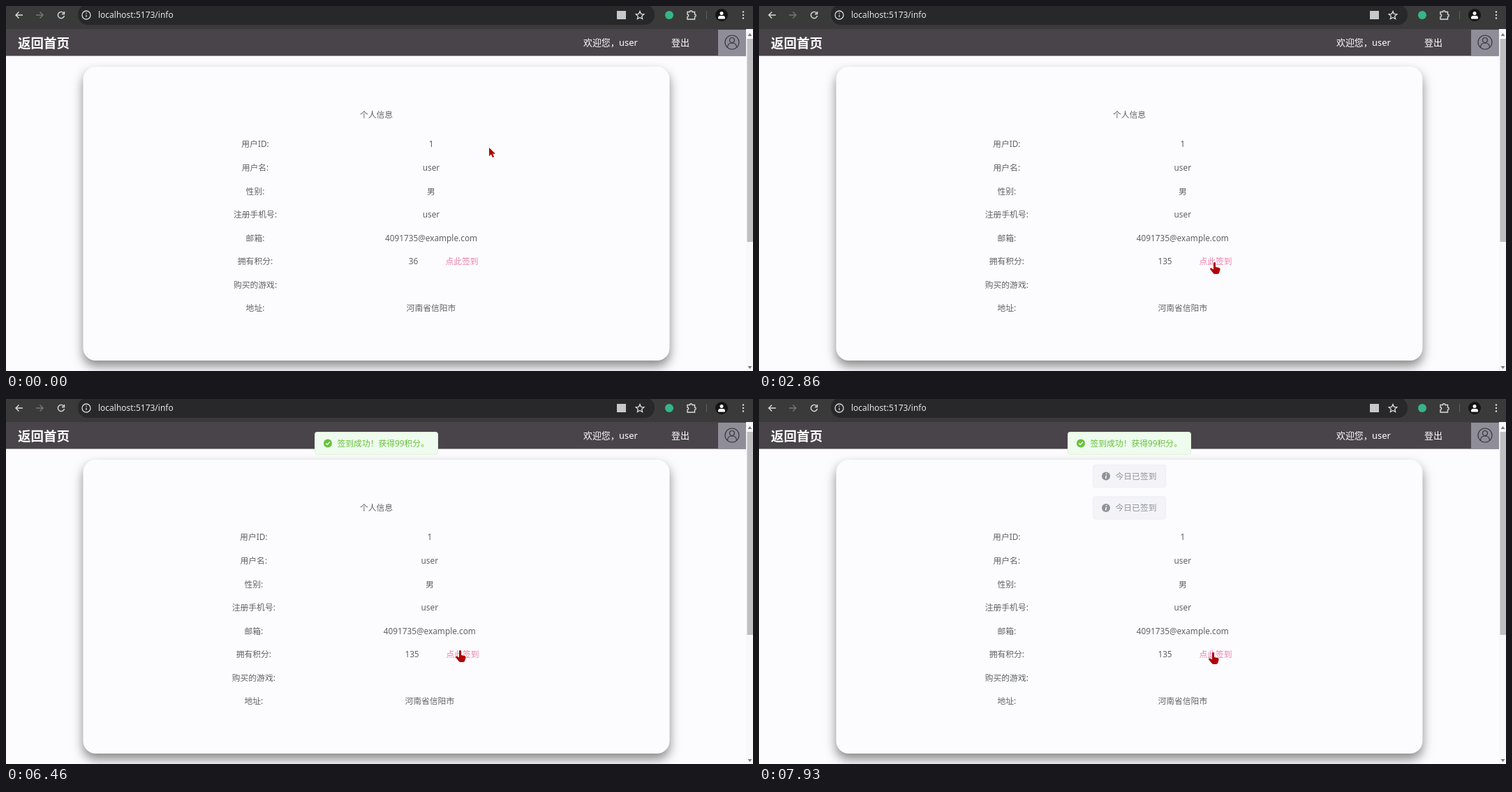
Recreate the animation shown at these times as an HTML page with a canvas. Size 1070 by 523 pixels, loop 8 s.

```html
<!DOCTYPE html>
<html lang="zh">
<head>
<meta charset="utf-8">
<style>
html, body { margin: 0; width: 100%; height: 100%; overflow: hidden; background: #fcfcfe }
canvas { display: block }
</style>
</head>
<body>
<canvas id="stage" width="1070" height="523"></canvas>
<script>
const c = document.getElementById('stage').getContext('2d');
const LOOP = 8000;
const FONT = '"Noto Sans", "Noto Sans CJK SC", "Noto Sans CJK", sans-serif';

// Pointer keys: time, x, y
const path = [
  [0, 692, 203], [860, 651, 317], [1460, 652, 331], [1600, 652, 358], [1660, 652, 367],
  [3560, 652, 367], [4400, 583, 118], [4730, 560, 97], [5260, 572, 62], [5460, 566, 66],
  [5560, 566, 66], [6400, 650, 360], [6560, 650, 360], [6660, 650, 363], [LOOP, 650, 363]
];
const loads = [2400, 6800, 7440];
const toasts = [
  { at: 2860, text: '签到成功！获得99积分。', x: 442, y: 47, w: 177, ink: '#67c23a', fill: '#eefbee', edge: '#e1f3d8', ok: true },
  { at: 7120, text: '今日已签到', x: 478, y: 94, w: 105, ink: '#909399', fill: '#f4f4f8', edge: '#eeeef4' },
  { at: 7680, text: '今日已签到', x: 478, y: 139.5, w: 105, ink: '#909399', fill: '#f4f4f8', edge: '#eeeef4' }
];
const rows = [['用户ID:', '1'], ['用户名:', 'user'], ['性别:', '男'], ['注册手机号:', 'user'],
  ['邮箱:', '4091735@example.com'], ['拥有积分:', ''], ['购买的游戏:', ''], ['地址:', '河南省信阳市']];

const clamp = v => Math.max(0, Math.min(1, v));
const smooth = v => v * v * (3 - 2 * v);

function rect(x, y, w, h, fill, r = 0) {
  c.beginPath();
  c.roundRect(x, y, w, h, r);
  c.fillStyle = fill;
  c.fill();
}
function disc(x, y, r, fill) {
  c.beginPath();
  c.arc(x, y, r, 0, 7);
  c.fillStyle = fill;
  c.fill();
}
function line(d, color, width = 1.4) {
  c.strokeStyle = color;
  c.lineWidth = width;
  c.stroke(new Path2D(d));
}
function text(s, x, y, color, align = 'center', size = 11.8, weight = 400) {
  c.font = `${weight} ${size}px ${FONT}`;
  c.textAlign = align;
  c.fillStyle = color;
  c.fillText(s, x, y + size * .37);
}

function toolbar() {
  const ink = '#dcdce0';
  rect(0, 0, 1070, 33, '#3a3a3a');
  rect(103, -2, 826, 29, '#28282a', 14);
  line('M24 13H14M18.5 8.5L14 13l4.5 4.5', ink);
  line('M43 13h10M48.5 8.5L53 13l-4.5 4.5', '#77777a');
  line('M82.5 10A4.6 4.6 0 1 0 83.5 14M83.5 8v3.5h-3.5', ink);
  line('M121 13a6 6 0 1 0-12 0a6 6 0 1 0 12 0M115 12.5v3.5M115 9.5v1.4', ink, 1.3);
  text('localhost:5173/info', 132, 13, '#e4e4e8', 'left', 12);
  rect(875, 7, 13, 12, '#c8c8cc');
  line('M908 7.5l1.7 3.8 4.1.4-3.1 2.7.9 4.1-3.6-2.1-3.6 2.1.9-4.1-3.1-2.7 4.1-.4z', ink, 1.3);
  disc(950, 13, 6, '#35b58a');
  line('M976 8.5h3.5a1.7 1.7 0 0 1 3.4 0h3.6v3.5a1.7 1.7 0 0 1 0 3.4v3.6h-10.5v-3.6a1.7 1.7 0 0 0 0-3.4z', ink);
  line('M1003.5 7v12', '#5c5c60', 1);
  disc(1025, 13, 9, '#141416');
  disc(1025, 10.5, 2.5, '#fff');
  rect(1020, 14, 10, 4.5, '#fff', [3, 3, 1, 1]);
  for (const y of [8.5, 13, 17.5]) disc(1056, y, 1.2, ink);
}

function header() {
  rect(0, 33, 1060, 38.5, '#49444a');
  text('返回首页', 17, 53, '#fff', 'left', 18.5, 700);
  text('欢迎您，', 827, 52.5, '#fff', 'left', 12.9, 500);
  text('user', 878, 52.5, '#fff', 'left', 12.9, 500);
  text('登出', 966, 52.5, '#fff', 'center', 13, 500);
  rect(1020, 34, 40, 37.5, '#8f8d98');
  line('M1050 52a10 10 0 1 0-20 0a10 10 0 1 0 20 0M1043.5 49a3.5 3.5 0 1 0-7 0a3.5 3.5 0 1 0 7 0M1033.5 59.5q0-6.5 6.5-6.5t6.5 6.5', '#38343c', 1.2);
}

function scrollbar() {
  rect(1060, 33, 10, 490, '#f8f8fa');
  rect(1061.5, 47, 8.5, 291, '#bebec0');
  c.fillStyle = '#77777c';
  c.fill(new Path2D('M1062.5 43h6l-3-4zM1062.5 516h6l-3 4z'));
}

function page(t, dim) {
  rect(0, 33, 1070, 490, '#fcfcfe');
  c.save();
  c.shadowColor = 'rgba(20,20,20,.5)';
  c.shadowBlur = 15;
  c.shadowOffsetY = 8;
  rect(110.5, 87, 840, 421, '#fcfcfe', 18);
  c.restore();
  text('个人信息', 530.5, 156, '#606266');

  const signed = t >= 2860, shift = signed ? -2.2 : 0;
  rows.forEach(([label, value], i) => {
    const y = 198 + i * 33.57;
    if (i % 2 === 0) rect(279, y - 17, 503, 33, `rgba(0,0,10,${.032 * dim})`);
    text(label, 357 + shift, y, '#606266');
    text(value, 609 + shift, y, '#606266');
  });
  text(signed ? '135' : '36', signed ? 581.5 : 583.5, 366, '#606266');
  text('点此签到', signed ? 654 : 653, 366, '#ec7fab');
}

function loader(t, dim) {
  if (!dim) return;
  c.save();
  c.globalAlpha = dim;
  rect(0, 33, 1060, 490, 'rgba(0,0,0,.08)');
  c.translate(530, 335);
  c.rotate((t - 7600) * .006);
  c.beginPath();
  c.arc(0, 0, 20.5, .8, 5.05);
  c.closePath();
  c.fillStyle = '#cdfbf0';
  c.fill();
  c.restore();
}

function toast({ at, text: label, x, y, w, ink, fill, edge, ok }, t) {
  const k = smooth(clamp((t - at) / 250));
  if (!k) return;
  c.save();
  c.globalAlpha = k;
  c.translate(x, y - 33 * (1 - k));
  rect(0, 0, w, 33, edge, 4);
  rect(1, 1, w - 2, 31, fill, 3);
  disc(19, 16.5, 6, ink);
  line(ok ? 'M16.3 16.5l2 2 3.7-4' : 'M19.3 15.5l-.7 4.5M19.6 12.5v1.5', '#fff', 1.5);
  text(label, 32.5, 16.5, ink, 'left');
  c.restore();
}

function pointer(t, busy) {
  const i = path.findIndex(p => p[0] > t);
  const [t0, x0, y0] = path[i - 1], [t1, x1, y1] = path[i];
  const k = smooth((t - t0) / (t1 - t0));
  const x = x0 + (x1 - x0) * k, y = y0 + (y1 - y0) * k;
  const hand = !busy && x > 629 && x < 678 && y > 357 && y < 375;
  const shape = new Path2D(hand
    ? 'M-1 1q1.5-2 3 0v6l5 1q2 .5 1.5 3l-1 3q-.5 3-3 3H1q-2 0-3-2l-4-5q0-2 2-1.5l3 2z'
    : 'M0 0v12l2.8-2.5 2.2 4.5 2.2-1-2.1-4.3h3.9z');
  c.save();
  c.translate(x, y);
  c.strokeStyle = 'rgba(255,235,235,.8)';
  c.lineWidth = 1;
  c.stroke(shape);
  c.fillStyle = '#b00406';
  c.fill(shape);
  c.restore();
}

function draw() {
  const t = performance.now() % LOOP;
  const dim = Math.max(...loads.map(at => smooth(clamp(1 - Math.abs(t - at - 160) / 160))));
  const busy = loads.some(at => t >= at && t < at + 440);
  page(t, dim);
  header();
  scrollbar();
  loader(t, dim);
  toolbar();
  toasts.forEach(item => toast(item, t));
  pointer(t, busy);
  requestAnimationFrame(draw);
}
draw();
</script>
</body>
</html>
```
